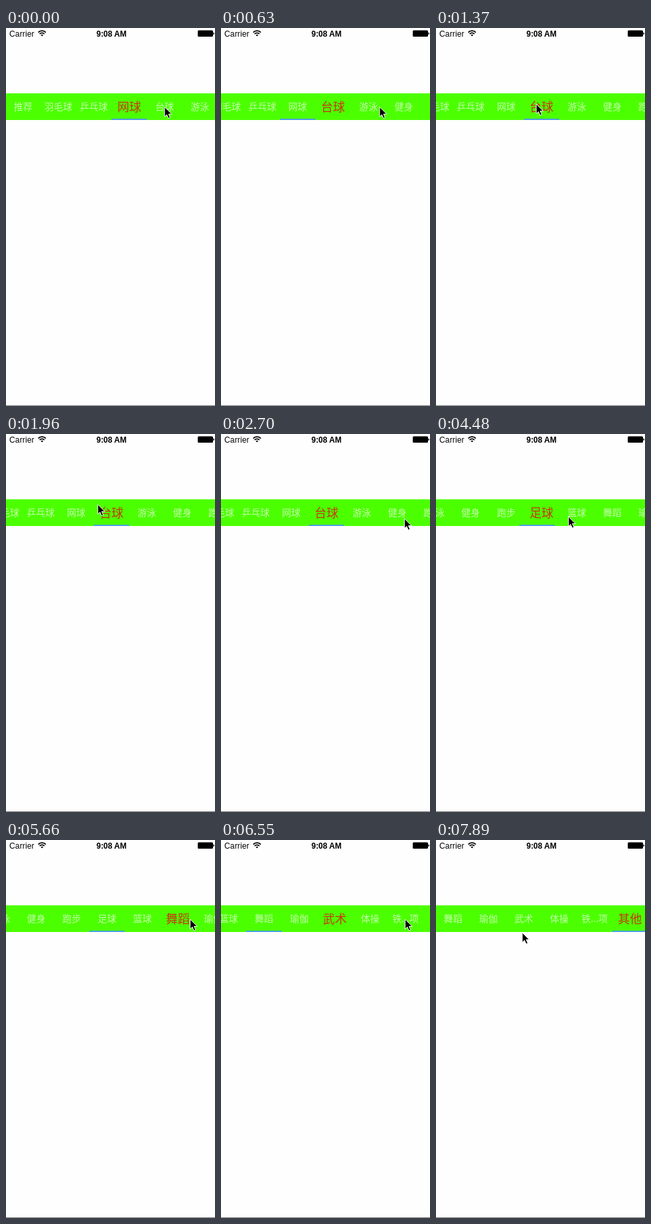
An HTML page for the animation above (8000 ms loop, 315 px wide and 567 px high).

```html
<!DOCTYPE html>
<html lang="zh-CN">
<head>
<meta charset="utf-8">
<title>Scrolling tabs</title>
<style>
  html, body { margin: 0; width: 100%; height: 100%; overflow: hidden; background: #fefefe; }
  svg { display: block; }
  text { font-family: "Liberation Sans", Arial, sans-serif; font-size: 12px; }
  .tab {
    font: 300 14px "Noto Sans CJK SC", "Noto Sans CJK", sans-serif;
    fill: #fff; fill-opacity: .68; text-anchor: middle;
  }
  .tab.on { font-size: 18px; font-weight: 500; fill: #c8360c; fill-opacity: 1; }
</style>
</head>
<body>
<svg width="315" height="567" viewBox="0 0 315 567">
  <rect width="315" height="567" fill="#fefefe"/>
  <text x="5" y="12.5" letter-spacing=".15">Carrier</text>
  <g fill="none" stroke="#000" stroke-width="1.7">
    <path d="M48.6 6.7a7.8 7.8 0 0 1 11.4 0M50.7 8.9a5 5 0 0 1 7.2 0"/>
    <path d="M54.3 12.4l-1.8-1.9a2.6 2.6 0 0 1 3.6 0z" fill="#000" stroke="none"/>
  </g>
  <text x="159" y="12.5" font-weight="700" text-anchor="middle">9:08 AM</text>
  <rect x="289" y="3.5" width="23" height="9.5" rx="1.6"/>
  <path d="M312.4 6.6q1.5 .3 1.5 1.7t-1.5 1.7z"/>

  <rect y="98" width="315" height="40" fill="#4cff00"/>
  <g id="strip"><rect id="line" y="136" height="2" fill="#4a9fe0"/></g>
  <rect y="566" width="315" height="1" fill="#777"/>
  <path id="cursor" d="M.5 .9V15.6L3.9 12.5 6.3 18 8.9 16.9 6.5 11.6H11.2Z" stroke="#fff"/>
</svg>
<script>
const LOOP = 8000, STEP = 148.2, LEAD = 26;   // the picture advances in even steps
const SLIDE = 237;                            // duration of one scroll or underline move
const W = 320 / 6, LEFT = -1;
const names = '推荐 羽毛球 乒乓球 网球 台球 游泳 健身 跑步 足球 篮球 舞蹈 瑜伽 武术 体操 铁...项 其他'.split(' ');
const END = names.length - 6;

const FIRST = 3;
const taps = [[456, 4], [2975, 6], [4057, 8], [5598, 10], [6409, 12], [7214, 15]];

// Pointer way points: time, x, y
const path = [
  [1063, 238.5, 117.5], [1360, 150.5, 113], [1656, 101, 105], [1804, 104, 104],
  [2249, 205, 106], [2694, 276, 126], [4176, 276, 126], [4472, 199, 123],
  [4768, 201, 123], [5065, 282, 119], [5213, 277, 118], [7584, 277, 118], [7880, 129.5, 138]
];

const $ = id => document.getElementById(id);
const strip = $('strip'), line = $('line'), cursor = $('cursor');
line.setAttribute('width', W);

const tabs = names.map((name, i) => {
  const el = document.createElementNS('http://www.w3.org/2000/svg', 'text');
  el.textContent = name;
  el.setAttribute('x', (i + .5) * W);
  strip.append(el);
  return el;
});

const clamp = p => Math.min(1, Math.max(0, p));
const mix = (a, b, p) => a + (b - a) * p;
const ease = p => p < .5 ? 4 * p ** 3 : 1 - 4 * (1 - p) ** 3;
const slide = ms => ease(clamp(ms / SLIDE));
const move = (el, x, y) => el.setAttribute('transform', `translate(${x} ${y})`);

// Centre the tab, but run on to the end when less than one tab is left
function target(tab) {
  const centred = Math.max(0, tab - 2.5);
  return centred > END - 1 ? END : centred;
}

function pointer(t) {
  const i = path.findIndex(p => p[0] > t);
  if (i < 1) return path.at(i).slice(1);
  const [a, b] = [path[i - 1], path[i]];
  const p = (t - a[0]) / (b[0] - a[0]);
  return [mix(a[1], b[1], p), mix(a[2], b[2], p)];
}

function draw(now) {
  const t = LEAD + Math.floor((now - LEAD) / STEP) * STEP;
  let tab = FIRST, offset = 0, under = FIRST;
  for (const [at, next] of taps) {
    if (t < at) break;
    // The underline follows once the strip has come to rest
    const wait = target(next) === target(tab) ? 0 : SLIDE;
    offset = mix(offset, target(next), slide(t - at));
    under = mix(under, next, slide(t - at - wait));
    tab = next;
  }
  move(strip, LEFT - offset * W, 0);
  line.setAttribute('x', under * W);
  tabs.forEach((el, i) => {
    const on = i === tab;
    el.setAttribute('class', on ? 'tab on' : 'tab');
    el.setAttribute('y', on ? 124.8 : 123.3);
  });
  move(cursor, ...pointer(t));
}

const start = performance.now();
function tick() {
  draw((performance.now() - start) % LOOP);
  requestAnimationFrame(tick);
}
tick();
</script>
</body>
</html>
```
